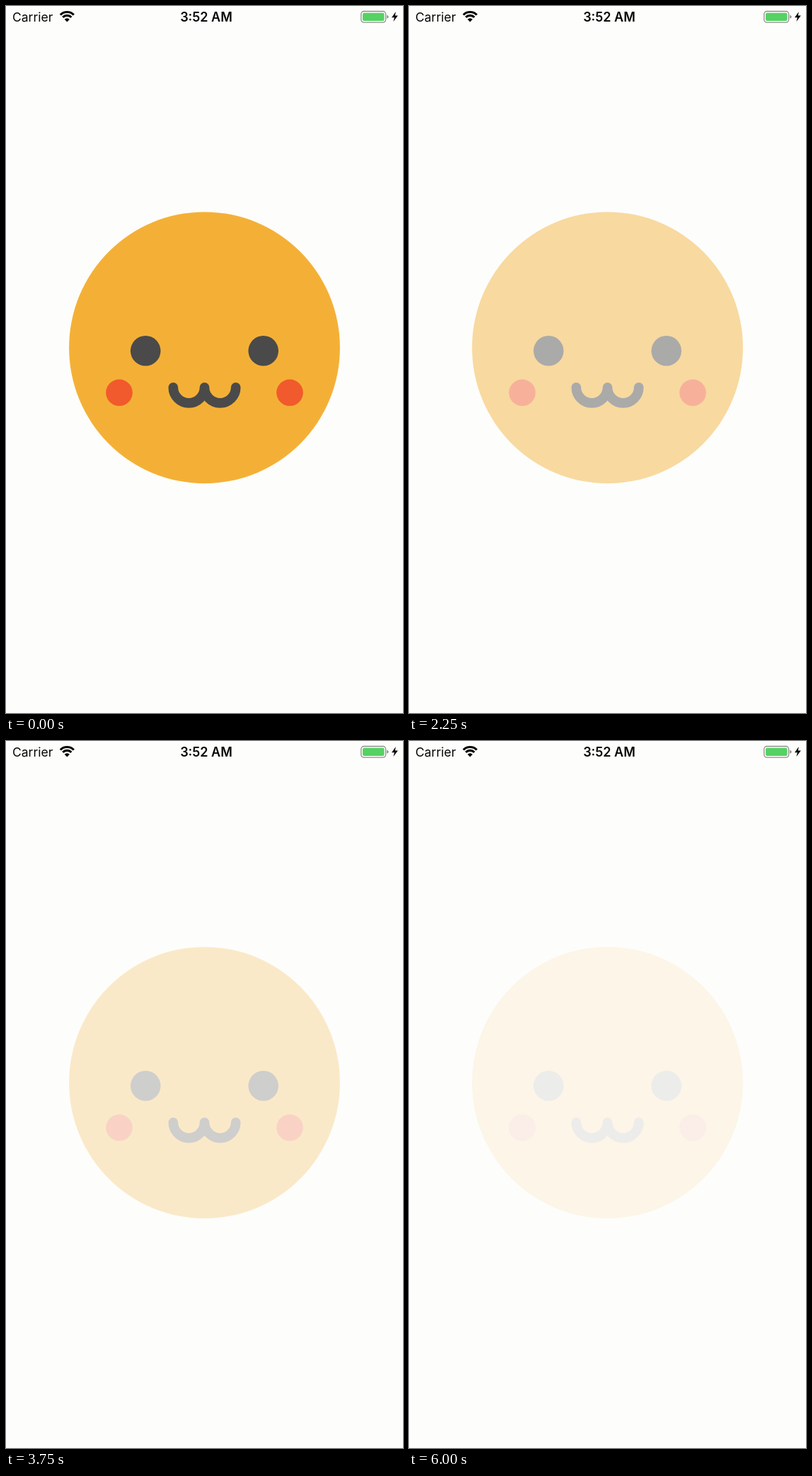
An HTML page that plays this animation: 561x997 px, repeating every 6030 ms.

```html
<!DOCTYPE html>
<html lang="en">
<head>
<meta charset="utf-8">
<title>Blinking face</title>
<style>
  html, body { margin: 0; width: 100%; height: 100%; overflow: hidden; background: #fdfdfb; }
  svg { display: block; width: 561px; height: 997px; }
  text { font-family: Inter, Roboto, sans-serif; fill: #050505; }
  .carrier { font-size: 17.5px; }
  .clock { font-size: 18px; font-weight: 600; text-anchor: middle; }
  .face { animation: pulse 6030ms infinite; }

  /* Hold, then fade out and back; each rise mirrors the fall. */
  @keyframes pulse {
    0% { opacity: 1; }
    14.93%, 48.67%, 82.34% { opacity: 1; animation-timing-function: cubic-bezier(.33, .16, .67, .55); }
    31.34%, 65%, 98.6% { opacity: .04; animation-timing-function: cubic-bezier(.33, .45, .67, .84); }
    98.6% { animation-timing-function: linear; }
    100% { opacity: .11; }
  }
</style>
</head>
<body>
<svg viewBox="0 0 561 997">
  <text class="carrier" x="9" y="21.5">Carrier</text>
  <g fill="none" stroke="#050505" stroke-width="3.1">
    <path d="M76.8 12.5A13.4 13.4 0 0 1 95.8 12.5"/>
    <path d="M80.2 15.9A8.6 8.6 0 0 1 92.4 15.9"/>
  </g>
  <path d="M86.3 22.4L82.7 18.8A5 5 0 0 1 89.9 18.8Z" fill="#050505"/>
  <text class="clock" x="283" y="21.7">3:52 AM</text>

  <rect x="501.8" y="7.5" width="34.8" height="15.6" rx="3.8" fill="none" stroke="#8e8e8e" stroke-width="1.3"/>
  <rect x="504" y="9.7" width="30.5" height="11.2" rx="2" fill="#55d263"/>
  <path d="M538.2 12.8Q540.6 13.4 540.6 15.3T538.2 17.8Z" fill="#8e8e8e"/>
  <path d="M550.8 8L545 16.2H548.8L547.4 22L553.8 13.6H549.8Z" fill="#050505"/>

  <g class="face">
    <circle cx="280.5" cy="481.8" r="191.4" fill="#f4b036"/>
    <g fill="#4a4a4a">
      <circle cx="197.2" cy="486.3" r="21.3"/>
      <circle cx="363.7" cy="486.3" r="21.3"/>
    </g>
    <g fill="#f15a2c">
      <circle cx="160" cy="545.3" r="18.8"/>
      <circle cx="401" cy="545.3" r="18.8"/>
    </g>
    <path d="M236.3 537.8A22.1 22.1 0 0 0 280.5 537.8A22.1 22.1 0 0 0 324.7 537.8"
      fill="none" stroke="#4a4a4a" stroke-width="13.7" stroke-linecap="round" stroke-linejoin="round"/>
  </g>
</svg>
</body>
</html>
```
